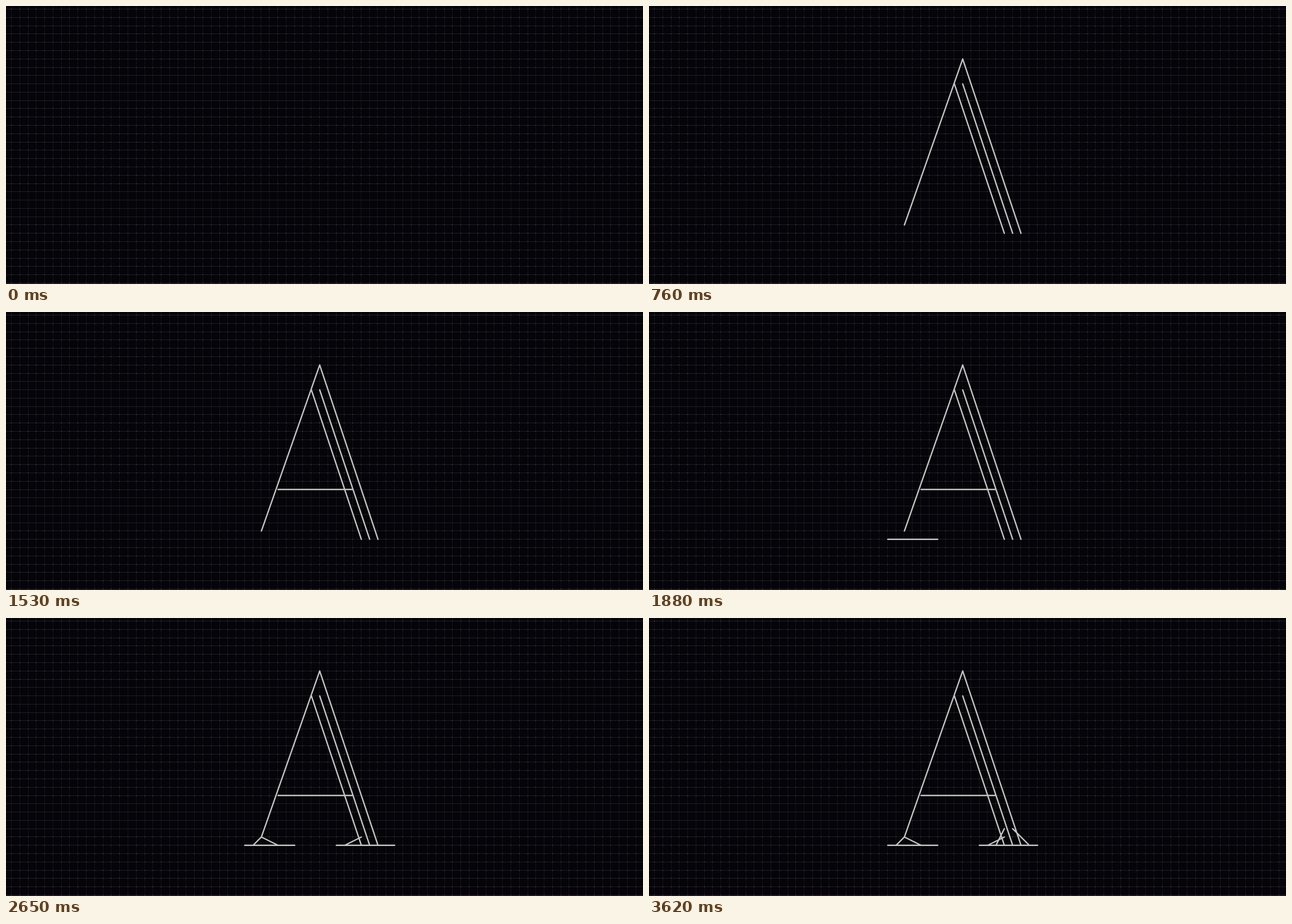
Animation of 1131x495 px, one loop 3.69 s. Source, as an HTML page with a canvas:

```html
<!DOCTYPE html>
<html>
<head>
<meta charset="utf-8">
<style>
  html, body { margin: 0; width: 100%; height: 100%; overflow: hidden; background: #050408; }
  canvas { display: block; }
</style>
</head>
<body>
<canvas id="stage" width="1131" height="495"></canvas>
<script>
const W = 1131, H = 495, LOOP = 3690, STEP = 70;
const BASE = 27, CELL = 14.783;
const gx = k => 10 + CELL * k;
const gy = k => 5.6 + CELL * k;

// Strokes are in grid units; heights count up from the baseline.
const line = (x0, h0, x1, h1) => ({ x0, y0: BASE - h0, x1, y1: BASE - h1 });
const drop = (x, h, dx) => line(x, h, x + dx, 0);
const leg = (x, h) => drop(x, h, h / 3);
const foot = (x, length) => drop(x, 0, length);

// Each phase draws its strokes one after another, in steps.
const phases = [
  { at: 0, gap: 2.3, strokes: [line(30, 1, 37, 21), leg(37, 21), leg(36, 18), leg(37, 18)] },
  { at: 15, gap: 0, strokes: [line(32, 6, 41, 6)] },
  { at: 22, gap: 3, strokes: [foot(28, 6), foot(39, 7), drop(30, 1, -1), drop(30, 1, 2), drop(42, 1, -2)] },
  { at: 39, gap: 6, strokes: [drop(42, 2, -1), drop(43, 2, 2)] }
];
const DRAW_STEPS = 2;

const ctx = document.getElementById("stage").getContext("2d");

function makeGrid() {
  const grid = document.createElement("canvas");
  grid.width = W;
  grid.height = H;
  const g = grid.getContext("2d");
  const rect = (color, x, y, w, h) => {
    g.fillStyle = color;
    g.fillRect(Math.floor(x), Math.floor(y), w, h);
  };
  rect("#050408", 0, 0, W, H);
  for (let y = gy(0); y < H; y += CELL) rect("#201c2a", 0, y, W, 1);
  for (let x = gx(0) - 0.5; x < W; x += CELL) {
    for (let y = 0; y < H; y += 3) rect("#303036", x, y, 1, 1);
    for (let y = gy(0); y < H; y += CELL) rect("#5c5a64", x, y, 1, 1);
  }
  rect("#23102a", 0, H - 1, W, 1);
  return grid;
}

// The drawing rests for a moment after the seventh step.
function stepAt(t) {
  return t < 690 ? Math.min(7, Math.floor(t / STEP)) : 8 + Math.floor((t - 690) / STEP);
}

// The loose end snaps to the grid while it is dragged.
function drag(s, p) {
  const snap = (a, b) => Math.round(a + (b - a) * Math.min(1, p));
  ctx.moveTo(gx(s.x0), gy(s.y0));
  ctx.lineTo(gx(snap(s.x0, s.x1)), gy(snap(s.y0, s.y1)));
}

const grid = makeGrid();

function draw(t) {
  const step = stepAt(t % LOOP);
  ctx.drawImage(grid, 0, 0);
  ctx.strokeStyle = "#c6c6c6";
  ctx.lineWidth = 2.4;
  ctx.lineCap = "round";
  ctx.beginPath();
  for (const { at, gap, strokes } of phases) {
    strokes.forEach((s, i) => {
      const p = (step - at - i * gap) / DRAW_STEPS;
      if (p > 0) drag(s, p);
    });
  }
  ctx.stroke();
}

const start = performance.now();
function tick() {
  draw(performance.now() - start);
  requestAnimationFrame(tick);
}
tick();
</script>
</body>
</html>
```
